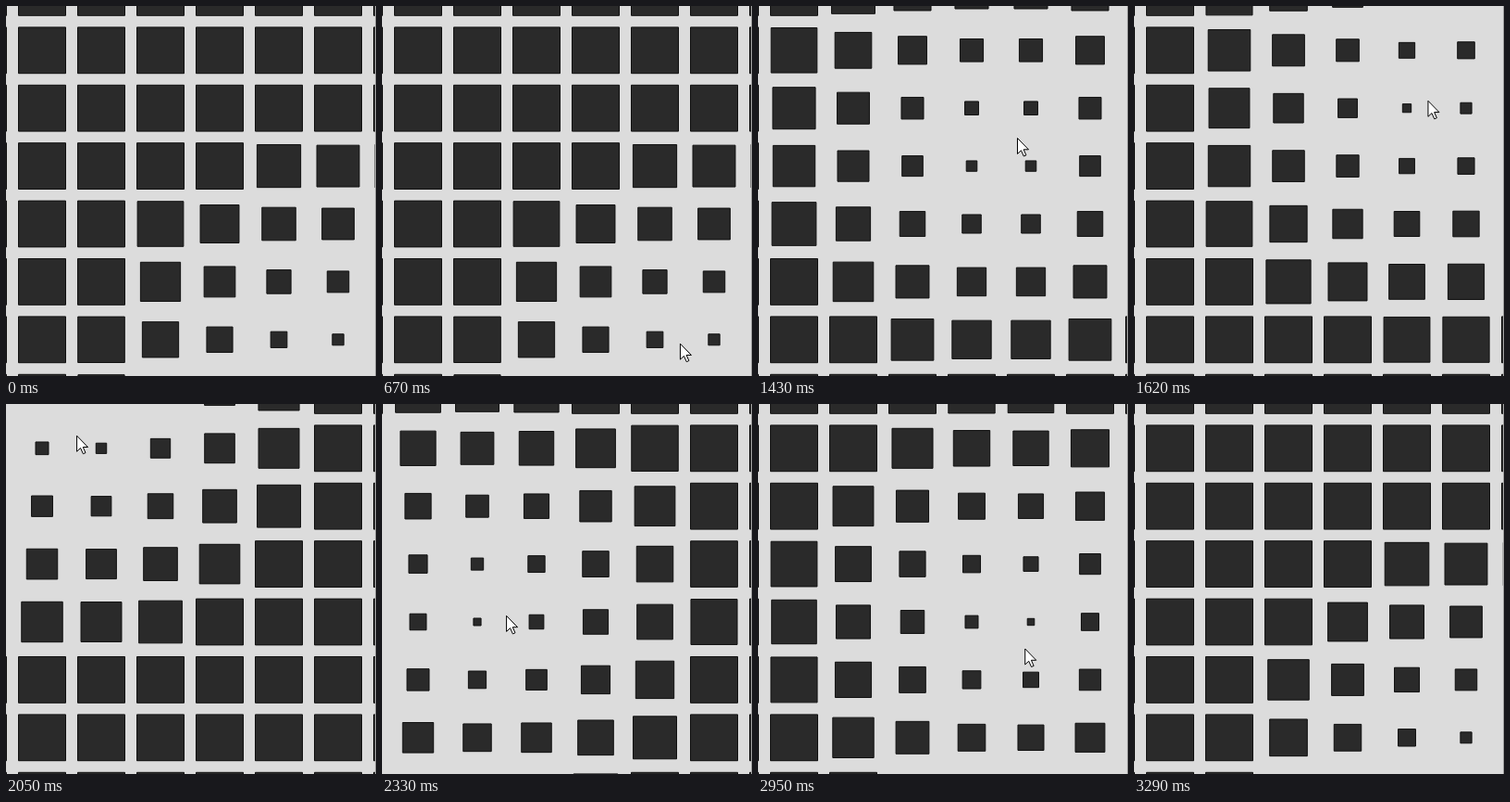
Recreate the animation shown at these times as an HTML page with a canvas. Size 400 by 399 pixels, loop 3720 ms.

```html
<!DOCTYPE html>
<html lang="en">
<head>
<meta charset="utf-8">
<title>Squares shrinking around the pointer</title>
<style>
  html, body { margin: 0; width: 100%; height: 100%; overflow: hidden; background: #dcdcdc; }
  canvas { display: block; }
</style>
</head>
<body>
<canvas id="stage" width="400" height="399"></canvas>
<script>
const ctx = document.getElementById('stage').getContext('2d');
const LOOP = 3720;
const LEAD = 55; // the squares follow the pointer by this many ms
const ENTER = 560, PARK = 1050, MOVE = 1225, EXIT = 3290;

// Key points of the pointer path: time, x, y
const path = [
  [1170, 353, 400], [1240, 449, 362], [1295, 262, 214],
  [1620, 319, 112], [1675, 318, 102], [2050, 81, 20], [2105, 76, 33],
  [2320, 105, 215], [2590, 248, 206], [2645, 258, 194],
  [2790, 292, 164], [2950, 281, 232], [3005, 288, 263], [EXIT, 361, 400]
];
const arrow = new Path2D('M0 0V17L4 13.3L6.8 19.5L9.4 18.4L6.7 12.3H12Z');

const clamp = v => Math.min(1, Math.max(0, v));

// Smooth curve through the key points, at rest at both ends
function pathAt(t) {
  let i = 0;
  while (i < path.length - 2 && t > path[i + 1][0]) i++;
  const a = path[i], b = path[i + 1], span = b[0] - a[0];
  const u = clamp((t - a[0]) / span), v = 1 - u;
  const slope = (n, k) => {
    const p = path[n - 1], q = path[n + 1];
    return p && q ? (q[k] - p[k]) / (q[0] - p[0]) * span : 0;
  };
  return [1, 2].map(k =>
    a[k] * v * v * (1 + 2 * u) + b[k] * u * u * (3 - 2 * u) +
    slope(i, k) * u * v * v - slope(i + 1, k) * u * u * v);
}

function pointerAt(t) {
  if (t >= MOVE) return pathAt(t + LEAD);
  const u = clamp((t - ENTER) / (PARK - ENTER));
  return [326 - 18 * u, 399 - 156 * u];
}

function drawSquares([mx, my]) {
  ctx.fillStyle = '#2a2a2a';
  ctx.strokeStyle = '#101010';
  for (let row = -1; row < 7; row++) {
    for (let col = -1; col < 7; col++) {
      const x = 39 + 64 * col, y = 47.8 + 62.4 * row;
      const size = Math.min(52, 6 + 0.18 * Math.hypot(x - mx, y - my));
      const w = size - 1, h = size * 0.977 - 1;
      ctx.beginPath();
      ctx.rect(x - w / 2, y - h / 2, w, h);
      ctx.fill();
      ctx.stroke();
    }
  }
}

function drawPointer([x, y]) {
  ctx.save();
  ctx.translate(x + 0.5, y + 0.5);
  ctx.fillStyle = '#fff';
  ctx.strokeStyle = '#000';
  ctx.fill(arrow);
  ctx.stroke(arrow);
  ctx.restore();
}

function draw(t) {
  ctx.fillStyle = '#dcdcdc';
  ctx.fillRect(0, 0, 400, 399);
  drawSquares(pathAt(t));
  if (t > ENTER && t < EXIT) drawPointer(pointerAt(t));
  ctx.fillStyle = '#a4a4a4';
  ctx.fillRect(399, 0, 1, 399);
}

function tick() {
  draw(performance.now() % LOOP);
  requestAnimationFrame(tick);
}
tick();
</script>
</body>
</html>
```
